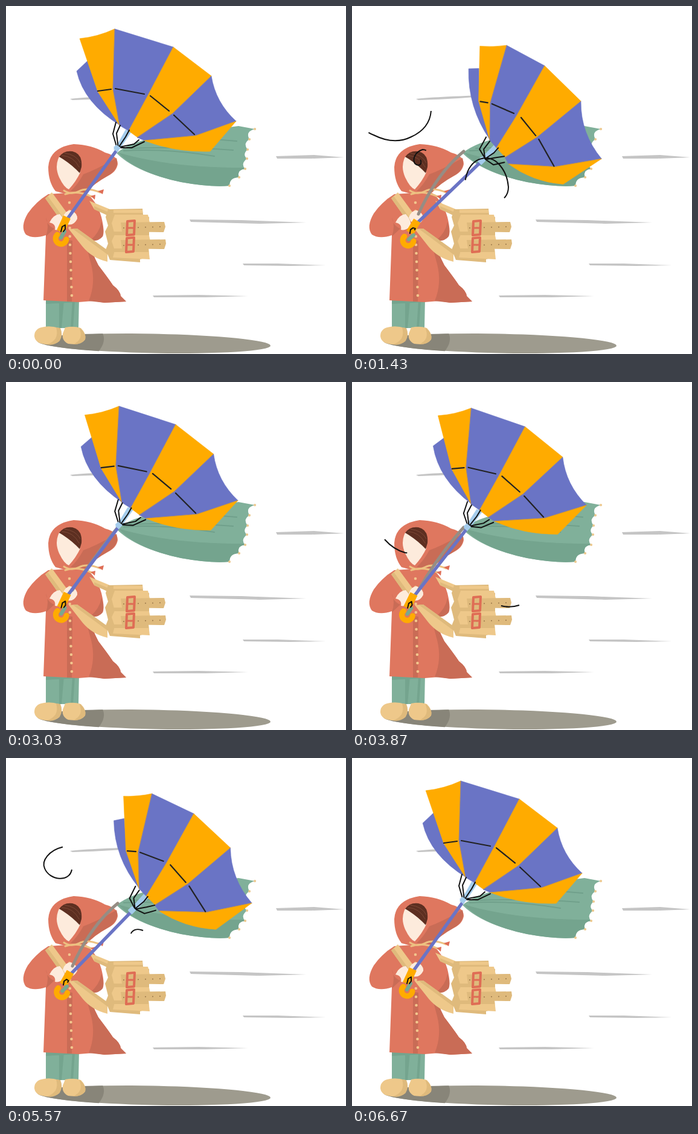
Animation of 563x577 px, one loop 6710 ms. Source, as an HTML page:

```html
<!DOCTYPE html>
<html lang="en">
<head>
<meta charset="utf-8">
<title>Windy day</title>
<style>
html, body { margin: 0; width: 100%; height: 100%; overflow: hidden; background: #fff; }
svg { display: block; width: 563px; height: 577px; }
.line { fill: none; stroke-linecap: round; stroke-linejoin: round; }
.coat { fill: #df775f; }
.coat-dark { fill: #c96c56; }
.tan { fill: #eec88a; }
.tan-dark { fill: #dfba7c; }
.skin { fill: #fdebdc; }
.teal { fill: #80b09a; }
.teal-dark { fill: #74a48e; }
.purple { fill: #6a74c5; stroke: #6a74c5; }
.orange { fill: #ffab00; stroke: #ffab00; }
.ink { stroke: #111; }
</style>
</head>
<body>
<svg viewBox="0 0 563 577">
  <!-- ground shadow and steady wind -->
  <g transform="rotate(1.1 245 560)">
    <ellipse cx="245" cy="559.5" rx="193" ry="16" fill="#9e9b8e"/>
    <path d="M52 560Q60 548 160 545Q166 558 154 574Q66 570 52 560" fill="#888579"/>
  </g>
  <g fill="#c5c5c5">
    <path d="M106 154Q140 150 250 147Q180 154 110 156Z"/>
    <path d="M447 249L510 247L560 251L505 253L449 253Z"/>
    <path d="M304 354L390 355L497 359L420 361L306 358Z"/>
    <path d="M392 427L450 427L530 430L470 431L394 430Z"/>
    <path d="M243 480L320 479L401 481L330 483L245 483Z"/>
  </g>

  <!-- scarf -->
  <path class="teal" d="M183 244Q205 225 260 215L385 199L412 204Q396 208 403 221Q392 228 400 238Q391 246 399 253Q388 262 396 270Q381 272 386 284Q370 284 370 298Q340 301 290 292Q215 276 183 244Z"/>
  <path class="teal-dark" d="M186 243Q270 268 394 268L396 270Q381 272 386 284Q370 284 370 298Q340 301 290 292Q215 276 186 243Z"/>
  <path class="line" stroke="#70a08b" stroke-width="2" d="M195 240Q270 236 345 249M205 236Q300 233 376 239M345 221L382 224"/>
  <path class="line" stroke="#edc98f" stroke-width="4" d="M412 204h.1M403 221h.1M400 238h.1M399 253h.1M396 270h.1M386 284h.1M370 298h.1"/>

  <!-- legs and shoes -->
  <path class="teal" d="M66 484H121L120 534H66Z"/>
  <path class="teal-dark" d="M66 484H121V491L66 494ZM88 488L96 488L92 534H88ZM110 488L114 488L111 534H107Z"/>
  <path class="tan" d="M58 533Q72 529 88 534Q94 546 88 556Q76 565 56 559Q44 553 48 541Q52 534 58 533ZM98 533Q112 530 124 534Q133 543 131 553Q124 563 103 560Q92 555 94 543Z"/>
  <path class="tan-dark" d="M83 533L90 534Q95 545 89 555Q79 564 68 561Q89 554 83 533ZM121 533Q134 543 131 553Q124 562 111 561Q130 553 121 533Z"/>

  <!-- coat -->
  <path class="coat" d="M70 312L130 308Q150 322 158 350Q164 375 160 382Q153 390 139 389Q141 408 153 430Q172 455 177 463Q189 472 190 481L199 490L163 492L145 489L120 491L62 488L66 380Q45 387 33 379Q23 366 36 344Q50 324 70 312Z"/>
  <path class="coat-dark" d="M130 387L139 389Q141 408 153 430Q172 455 177 463Q189 472 190 481L199 490L163 492L137 489Q149 460 141 428ZM101 388L110 389L109 490H101ZM139 389Q153 391 160 382Q163 373 158 358Q155 376 139 389ZM66 350Q68 365 80 369L66 382Q72 365 66 350Z"/>
  <path class="line" stroke="#f2c58c" stroke-width="4.6" stroke-dasharray="0 14" d="M105 326L106 396L109 482"/>

  <!-- satchel -->
  <path class="tan" d="M138 323L172 337L170 348L146 337ZM104 370L118 369L168 405V424Q142 418 126 398Z"/>
  <path class="tan-dark" d="M146 332L170 342V348L146 337ZM110 369L118 369L168 405V412Z"/>
  <path class="tan-dark" d="M169 337L226 336L227 346L237 350L236 402L237 416L222 420V425L172 421L165 404L169 394L164 374L169 364L165 350Z"/>
  <path class="tan" d="M180 346L235 346L239 363L236 376L239 390L236 402L238 420L177 417L180 405L175 390L180 379L175 360Z"/>
  <path class="tan" d="M178 338H226V343H178Z"/>
  <path class="tan-dark" d="M176 374H237V380H180ZM177 402H236V408H179ZM190 359L262 358L264 366L261 375L192 374ZM190 388L264 387L265 394L262 403L192 402Z"/>
  <path class="line" stroke="#9b784b" stroke-width="2" stroke-dasharray="0 12" d="M195 368L257 366M195 397L258 395"/>
  <path class="line" stroke="#df6d55" stroke-width="4" d="M201 357L213 356L212 379L200 380ZM200 385L212 384L211 407L199 408Z"/>
  <path class="line" stroke="#df6d55" stroke-width="3" d="M201 368h11M200 396h11"/>

  <!-- hood and face -->
  <path class="coat" d="M82 307Q70 292 70 267Q72 235 112 229Q142 230 164 243Q185 248 185 262Q183 275 168 282Q146 294 133 309L112 315Z"/>
  <path class="coat-dark" d="M183 252Q188 270 168 282Q146 294 132 309L107 307Q119 296 128 279Q150 271 183 252Z"/>
  <path class="skin" d="M88 250Q80 266 88 284Q96 301 104 304Q116 291 123 276L112 250Z"/>
  <path d="M88 250Q96 239 110 241Q127 245 125 267L122 277Q107 261 88 250Z" fill="#5d2f21"/>
  <path class="line" stroke="#7d4937" d="M93 248Q112 249 121 267M97 244Q116 246 123 260"/>
  <path class="line" stroke="#edc181" stroke-width="3" d="M96 306Q108 314 121 307T156 309M98 312Q118 305 142 316"/>
  <path fill="#df6d55" d="M152 307L162 304L160 312ZM140 315L148 313L147 321Z"/>

  <!-- shoulder strap and hands -->
  <path class="tan" d="M65 319L76 309L106 350L94 360Z"/>
  <path class="tan-dark" d="M65 319L69 315L98 355L94 360Z"/>
  <path class="skin" d="M72 359Q78 346 89 345Q99 356 97 365Q89 373 81 371Q83 361 72 359ZM94 351Q98 338 108 339Q119 344 118 353Q112 365 101 362Z"/>

  <path id="cord" class="line" stroke="#968d84" stroke-width="5"/>

  <!-- umbrella: every path moves from d to data-to -->
  <g id="umbrella">
    <path class="line" stroke="#6a74c5" stroke-width="5.4" d="M184 238L98 358" data-to="M214 259L108 360"/>
    <path class="line" stroke="#ffab00" stroke-width="13" style="stroke-linecap:butt" d="M101 350L90 374" data-to="M108 356L96 376"/>
    <path class="line" stroke="#ffab00" stroke-width="9" d="M85 379A9 9 0 1 0 100 387" data-to="M87 382A9 9 0 1 0 102 390"/>
    <path class="line" stroke="#78a98f" stroke-width="6" d="M97 374L91 384" data-to="M102 380L94 387"/>
    <path class="line ink" stroke-width="2" d="M91 374L93 366L98 363L98 370L95 374" data-to="M96 377L97 371L101 368L105 369L104 371"/>
    <path fill="#a4ccec" d="M178 237L184 230L198 205L208 208L190 235L184 242Z" data-to="M209 258L216 251L236 231L244 238L222 257L215 264Z"/>
    <g id="canopy" stroke-width=".6" stroke-linejoin="round">
      <path class="purple" d="M135 91L117 108Q129 161 189 198L152 142Z" data-to="M212 104L195 104Q193 168 229 222L212 158Z"/>
      <path class="orange" d="M122 54Q152 51 180 38L177 137L188 198L152 142Z" data-to="M214 67Q236 69 258 66L230 162L229 223L211 158Z"/>
      <path class="purple" d="M180 38L277 68L235 148L203 207L188 198L177 137Z" data-to="M258 66L320 100L274 182L240 236L229 223L230 162Z"/>
      <path class="orange" d="M277 68L340 116L276 178L218 218L203 207L235 148Z" data-to="M320 100L380 159L308 218L255 252L240 236L274 182Z"/>
      <path class="purple" d="M340 116Q347 160 381 191L314 215L229 223L217 218L276 178Z" data-to="M380 159Q379 212 414 255L337 268L260 263L254 252L308 218Z"/>
      <path class="orange" d="M381 191L338 241Q280 243 229 223L314 215Z" data-to="M414 255L350 297Q300 293 260 263L337 268Z"/>
      <path class="line" stroke="#b98b55" d="M180 38L177 137L188 198M277 68L235 148L203 207M340 116L276 178L218 218M381 191L314 215L229 223" data-to="M258 66L230 162L229 223M320 100L274 182L240 236M380 159L308 218L255 252M414 255L337 268L260 263"/>
      <path class="line" stroke="#222" stroke-width="2.2" d="M152 141L174 138M181 137L229 146M239 149L270 174M278 181L312 213" data-to="M214 159L226 161M233 163L269 179M281 186L305 216M310 222L335 267"/>
    </g>
    <path class="line ink" stroke-width="2" d="M184 236L177 212L182 193M186 236L183 211L189 198M186 235L198 217L204 206M188 234L212 229L220 222M188 235L208 235L229 225" data-to="M221 253L212 238L223 218M221 253L219 238L229 225M221 254L236 244L243 236M222 255L238 252L253 250M222 255L235 264L253 260"/>
    <path fill="#a4ccec" d="M178 234L183 230L190 235L184 242Z" data-to="M208 257L215 250L222 257L215 264Z"/>
  </g>

  <!-- gusts: start and end of the head, then of the tail, in ms -->
  <g fill="none" class="ink" stroke-width="2">
    <path class="gust" data-span="690 2210 1317 2690" d="M11 189C18 205 26 210 36 214C56 224 78 227 98 217C122 206 132 188 131 167C130 151 112 145 96 147C72 152 58 170 64 183C72 203 105 207 109 185"/>
    <path class="gust" data-span="255 1275 660 1790" d="M54 261Q69 278 88 283Q118 287 131 263C132 248 126 238 117 238C104 242 100 254 104 261C111 268 117 261 113 255"/>
    <path class="gust" data-span="405 1770 900 2305" d="M277 370Q262 375 247 371Q212 362 193 330Q184 308 188 287C191 269 201 256 215 253C239 247 257 274 259 300C259 315 249 324 238 325C219 325 207 313 205 298C206 287 214 281 227 286"/>
  </g>
</svg>
<script>
const LOOP = 6710, SWAY = LOOP / 2;
const $ = id => document.getElementById(id);
const clamp = x => Math.max(0, Math.min(1, x));

const parts = [...document.querySelectorAll('[data-to]')].map(el => ({
  el, from: el.getAttribute('d'), to: el.dataset.to.match(/[\d.]+/g)
}));
const gusts = [...document.querySelectorAll('.gust')].map(el => ({
  el, size: el.getTotalLength(), span: el.dataset.span.split(' ').map(Number)
}));

function morph({ el, from, to }, k) {
  let i = 0;
  el.setAttribute('d', from.replace(/[\d.]+/g, n => +n + (to[i++] - n) * k));
}

function blow({ el, size, span: [h0, h1, t0, t1] }, t) {
  const head = clamp((t - h0) / (h1 - h0)) * size;
  const tail = clamp((t - t0) / (t1 - t0)) * size;
  el.style.display = head - tail > .5 ? '' : 'none';
  el.setAttribute('stroke-dasharray', `0 ${tail} ${head - tail} ${size + 9}`);
}

function draw() {
  const t = performance.now() % SWAY;
  const k = (1 - Math.cos(2 * Math.PI * t / SWAY)) / 2 * 1.03;
  parts.forEach(p => morph(p, k));
  $('canopy').setAttribute('transform', `translate(0 ${-6 * k * clamp(1 - k)})`);
  const bow = clamp(k * 2);
  $('cord').setAttribute('d', `M185 241Q${146 - 5 * bow} ${294 - 17 * bow} 110 345`);
  $('cord').style.display = k > .03 ? '' : 'none';
  gusts.forEach(g => blow(g, t));
  requestAnimationFrame(draw);
}
draw();
</script>
</body>
</html>
```
